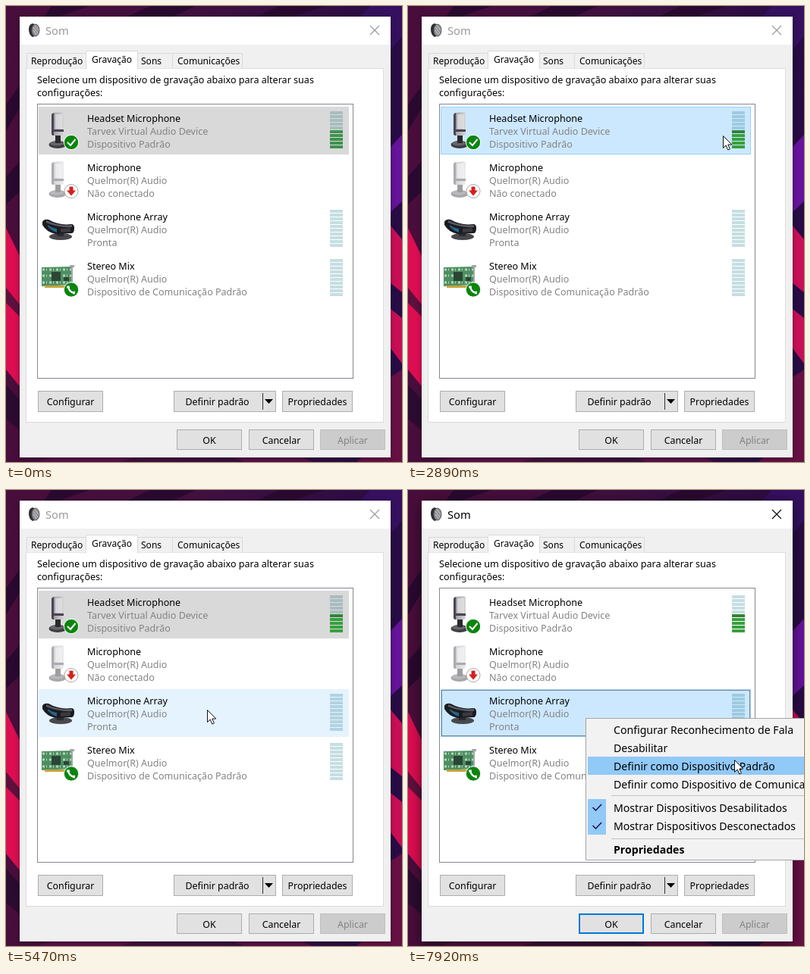
Write an HTML page that moves like this. It is 522x602 px and loops after 8 s.

```html
<!DOCTYPE html>
<html lang="pt">
<head>
<meta charset="utf-8">
<title>Som</title>
<style>
html, body { margin: 0; width: 100%; height: 100%; overflow: hidden; background: #2b0b2e; }
svg { display: block; font-family: "Noto Sans", sans-serif; font-size: 12.56px; }
#win { filter: drop-shadow(0 1px 3px rgba(0,0,0,.4)); }
.active #win { filter: drop-shadow(0 3px 8px rgba(0,0,0,.6)); }
#title { font-size: 14.7px; fill: #999; }
.active #title { fill: #000; }
#close { stroke: #999; }
.active #close { stroke: #000; }
#default, #focus { fill: none; visibility: hidden; }
.active #default, .active #focus { visibility: visible; }
#default { stroke: #0078d7; stroke-width: 2; }
#focus { stroke: #222; stroke-dasharray: 1 1; }
.tab { font-size: 12.06px; }
.btn { font-size: 12.4px; text-anchor: middle; }
.btn rect { fill: #e1e1e1; stroke: #adadad; }
.off rect { fill: #ccc; stroke: #bfbfbf; }
.off text { fill: #838383; }
.dim { fill: #838383; }
.bars { mix-blend-mode: multiply; fill: #c5dee1; }
#menu { font-size: 14.12px; }
</style>
</head>
<body>
<svg id="stage" width="522" height="602" viewBox="0 0 522 602">
  <defs>
    <linearGradient id="wall">
      <stop offset="0" stop-color="#490d3b"/><stop offset=".5" stop-color="#40103f"/><stop offset="1" stop-color="#280b45"/>
    </linearGradient>
    <linearGradient id="metal">
      <stop offset="0" stop-color="#77777c"/><stop offset=".3" stop-color="#a9a9ad"/><stop offset="1" stop-color="#d6d6d8"/>
    </linearGradient>
    <g id="mic">
      <ellipse cx="68" cy="183" rx="11.500" ry="5" fill="#3d3d43"/>
      <ellipse cx="67" cy="181.500" rx="9" ry="3" fill="#66666c"/>
      <path d="M65 168h7v13h-7z" fill="#29292e"/>
      <path d="M60 144q0-2 3-3l10-1q3 0 3 2v26q0 3-3 3H63q-3 0-3-3z" fill="url(#metal)"/>
      <path d="M60 144q0-2 3-3v30q-3 0-3-3zM60 163h16v3H60z" fill="#4b4354"/>
      <path d="M65 143h9v19h-9z" fill="#e6e6e7" opacity=".7"/>
    </g>
  </defs>

  <rect width="522" height="602" fill="url(#wall)"/>
  <path d="M60 0h50L70 14H50zM190 0h60l-30 14h-60zM360 0h60l-40 14h-50zM0 130l18-25v30L0 165zM0 225l18-20v40L0 262z" fill="#2a0930"/>
  <path d="M480 0h42v40l-15 18V14h-40z" fill="#35105f"/>
  <path d="M507 186l15-16v88l-15 14z" fill="#65139a"/>
  <path d="M507 290l15 18v70l-15-12zM507 400l15 12v60l-15-20z" fill="#c80f55"/>
  <path d="M507 490l15-10v122h-60l45-40z" fill="#661044"/>
  <path d="M0 293l18 37v172L0 480z" fill="#dc0d51"/>
  <path d="M0 372l18 22v16L0 392z" fill="#5e103c"/>
  <path d="M0 500l18 20v40L0 545z" fill="#2b0b30"/>
  <path d="M60 596h110l-20 6H40zM300 596h90l14 6h-90z" fill="#5a1048"/>

  <g id="win">
    <rect x="18" y="14" width="489" height="582" fill="#f0f0f0"/>
    <rect x="18" y="14" width="489" height="37" fill="#fff"/>
  </g>
  <path d="M35 23q-5 1-5 8 0 7 5 10l5-2V25z" fill="#2e2e32"/>
  <ellipse cx="39" cy="32" rx="5" ry="8" fill="#8d8d92" stroke="#5e5e63"/>
  <path d="M36 28l6 8m-6-4l4 6m-2-12l5 6" stroke="#d0d0d4"/>
  <text id="title" x="52" y="38">Som</text>
  <path id="close" d="M480 26l12 12m0-12l-12 12" fill="none" stroke-width="1.100"/>

  <rect x="26.500" y="82.500" width="471" height="467" fill="#fff" stroke="#dcdcdc"/>
  <g id="tabs" class="tab"></g>
  <text x="41" y="102">Selecione um dispositivo de gravação abaixo para alterar suas</text>
  <text x="41" y="119">configurações:</text>
  <rect x="41.500" y="129.500" width="416" height="362" fill="#fff" stroke="#828790"/>
  <g id="list"></g>
  <rect id="focus" x="44.500" y="264.500" width="406" height="60"/>

  <use href="#mic"/>
  <use href="#mic" y="65" opacity=".45"/>
  <circle cx="86" cy="180" r="9.700" fill="#0b850f" stroke="#fff"/>
  <path d="M81 180l4 4 6.500-8" fill="none" stroke="#fff" stroke-width="2"/>
  <circle cx="86" cy="244.500" r="9" fill="#fff" stroke="#a8a8a8"/>
  <path d="M83.500 238.500h5v5h3.500l-6 7-6-7h3.500z" fill="#d3211d"/>
  <ellipse cx="72" cy="304.500" rx="15" ry="4.500" fill="#48484d"/>
  <path d="M67 298h9v6h-9z" fill="#2b2b30"/>
  <path d="M48 285q2-4 8-3 14 8 30 6 4 0 4 5 0 6-3 7l-22 1q-12-3-17-12z" fill="#1b1b20"/>
  <path d="M53 283q16 8 34 6v3q-17 1-34-6z" fill="#5b5c63"/>
  <path d="M55 289q5 4 12 5v5q-8-3-12-8z" fill="#27658c"/>
  <path d="M72 294l13-1v5l-13 1z" fill="#3a3b41"/>
  <path d="M47 345l40-1v24l-40 2z" fill="#4d8f62"/>
  <path d="M48 348h38M48 356h38M48 365h38" stroke="#b5d2ba" stroke-width="3" stroke-dasharray="3 2 1 3"/>
  <path d="M60 351h12v12H60zM76 358h7v5h-7z" fill="#2b4635"/>
  <path d="M51 369h27v3H51z" fill="#c9a33c"/>
  <path d="M84 342h6v3h-2v33h-2v-33h-2z" fill="#a4a6a8"/>
  <circle cx="86" cy="374.500" r="9.700" fill="#0b850f" stroke="#fff"/>
  <path d="M82 370q1 8 8.500 9" fill="none" stroke="#fff" stroke-width="2.200"/>
  <path d="M82 369.500v3m6 6h3" stroke="#fff" stroke-width="3.500"/>

  <g id="buttons"></g>
  <rect id="default" x="226" y="560" width="84" height="25"/>
  <path d="M338.500 511v22" stroke="#333"/>
  <path d="M341 519h11l-5.500 6z"/>

  <g id="menu">
    <rect x="234.500" y="301.500" width="310" height="187" fill="#f2f2f2" stroke="#a5a5a5"/>
    <rect id="pick" x="237" width="300" height="24" fill="#91c9f7"/>
    <path d="M237 408h24v47h-24z" fill="#91c9f7"/>
    <path d="M243.500 419l4 4 7.500-8M243.500 443l4 4 7.500-8" fill="none" stroke="#1a0d4d" stroke-width="1.500"/>
    <path d="M268 403.500h254M268 460.500h254" stroke="#c3c3c3"/>
  </g>
  <path id="cursor" d="M.5.500v16l3.700-3.500 2.600 6 2.600-1.100-2.600-5.900h5z" fill="#fff" stroke="#111"/>
</svg>
<script>
const $ = id => document.getElementById(id);
function add(parent, tag, attrs, text) {
  const el = document.createElementNS("http://www.w3.org/2000/svg", tag);
  for (const k in attrs) el.setAttribute(k, attrs[k]);
  if (text) el.textContent = text;
  return parent.appendChild(el);
}

[["Reprodução", 27, 79, 33], ["Sons", 173, 47, 178], ["Comunicações", 219, 92, 226], ["Gravação", 105, 68, 113]]
  .forEach(([name, x, w, tx], i) => {
    const on = i === 3, top = on ? 59.5 : 62.5;
    add($("tabs"), "path", {
      d: `M${x + .5} ${on ? 83.5 : 82.5}V${top}h${w}V${on ? 83.5 : 82.5}`,
      fill: on ? "#fff" : "#f0f0f0", stroke: "#d9d9d9"
    });
    add($("tabs"), "text", { x: tx, y: on ? 75 : 77 }, name);
  });

const devices = [
  ["Headset Microphone", "Tarvex Virtual Audio Device", "Dispositivo Padrão"],
  ["Microphone", "Quelmor(R) Audio", "Não conectado"],
  ["Microphone Array", "Quelmor(R) Audio", "Pronta"],
  ["Stereo Mix", "Quelmor(R) Audio", "Dispositivo de Comunicação Padrão"]
];
const greens = [];
const rows = devices.map((lines, i) => {
  const y = 65 * i, list = $("list");
  const row = add(list, "rect", { x: 43.5, y: 133.5 + y, width: 408, height: 62 });
  lines.forEach((s, j) => add(list, "text", { x: 107, y: 153 + y + 17 * j, class: j ? "dim" : "" }, s));
  if (i !== 1) {
    const bars = add(list, "g", { class: "bars" });
    for (let b = 0; b < 10; b++) {
      const lit = i === 0 && b > 4;
      const bar = add(lit ? list : bars, "rect", { x: 427, y: 139 + y + 5 * b, width: 17, height: 4 });
      if (lit) greens.push(bar);
    }
  }
  return row;
});

[["Configurar", 42, 508, 86], ["Definir padrão", 221, 508, 135, "", 278.5], ["Propriedades", 364, 508, 93],
 ["OK", 225, 559, 86], ["Cancelar", 320, 559, 86], ["Aplicar", 414, 559, 86, "off"]]
  .forEach(([name, x, y, w, kind = "", mid = x + w / 2]) => {
    const g = add($("buttons"), "g", { class: "btn " + kind });
    add(g, "rect", { x: x + .5, y: y + .5, width: w - 1, height: y < 550 ? 27 : 26 });
    add(g, "text", { x: mid, y: y + 19 }, name);
  });

[["Configurar Reconhecimento de Fala", 322], ["Desabilitar", 346], ["Definir como Dispositivo Padrão", 370],
 ["Definir como Dispositivo de Comunicação Padrão", 394], ["Mostrar Dispositivos Desabilitados", 425],
 ["Mostrar Dispositivos Desconectados", 449], ["Propriedades", 480]]
  .forEach(([s, y]) => add($("menu"), "text", { x: 271, y, "font-weight": y === 480 ? 700 : 400 }, s));

// Pointer path: tick (1/15 s), x, y
const path = [
  [0, -20, 400], [3, -20, 400], [4, 16, 372], [8, 262, 172], [10, 262, 172], [13, 301, 142], [27, 301, 142],
  [28, 301, 146], [29, 301, 146], [34, 169, 171], [41, 429, 165], [46, 394, 181], [51, 442, 140], [53, 442, 137],
  [57, 451, 136], [62, 458, 150], [66, 430, 179], [67, 418, 193], [70, 470, 168], [75, 453, 176],
  [79, 453, 176], [80, 400, 215], [82, 265, 290], [84, 236, 301], [92, 234, 302], [97, 234, 302],
  [98, 245, 308], [102, 360, 347], [104, 405, 359], [105, 405, 359], [106, 418, 364], [108, 503, 367],
  [110, 503, 367], [119, 430, 356], [121, 430, 356]
];
function pointer(n) {
  const i = path.findIndex(p => p[0] > n);
  const [a, ax, ay] = path[i - 1], [b, bx, by] = path[i], k = (n - a) / (b - a);
  return [Math.round(ax + (bx - ax) * k), Math.round(ay + (by - ay) * k)];
}

// Fill and border of a list row
function rowStyle(i, hover, active) {
  if (active) return i === 2 ? ["#cce8ff", "#99d1ff"] : ["none", "none"];
  if (i === 0) return hover ? ["#cce8ff", "#99d1ff"] : ["#d9d9d9", "#d9d9d9"];
  return hover ? ["#e5f3ff", "#e5f3ff"] : ["none", "none"];
}

function draw(t) {
  const n = Math.floor(t * .015 + .35), [x, y] = pointer(n);
  const active = n >= 88;
  $("stage").setAttribute("class", active ? "active" : "");
  $("cursor").setAttribute("transform", `translate(${x} ${y})`);
  const over = x >= 43 && x < 451 ? Math.floor((y - 132) / 65) : -1;
  rows.forEach((row, i) => {
    const [fill, stroke] = rowStyle(i, i === over, active);
    row.setAttribute("fill", fill);
    row.setAttribute("stroke", stroke);
  });
  greens.forEach((g, i) => g.setAttribute("fill", n < 42 ? "#3f9150" : i ? "#37a03e" : "#2f8438"));
  $("menu").setAttribute("opacity", n < 92 ? 0 : n < 93 ? .5 : 1);
  const item = Math.floor((y - 304) / 24);
  $("pick").setAttribute("y", 304 + 24 * item);
  $("pick").setAttribute("opacity", n >= 97 && x >= 238 && item >= 0 ? 1 : 0);
}

const start = performance.now();
function tick() {
  draw((performance.now() - start) % 8000);
  requestAnimationFrame(tick);
}
tick();
</script>
</body>
</html>
```
